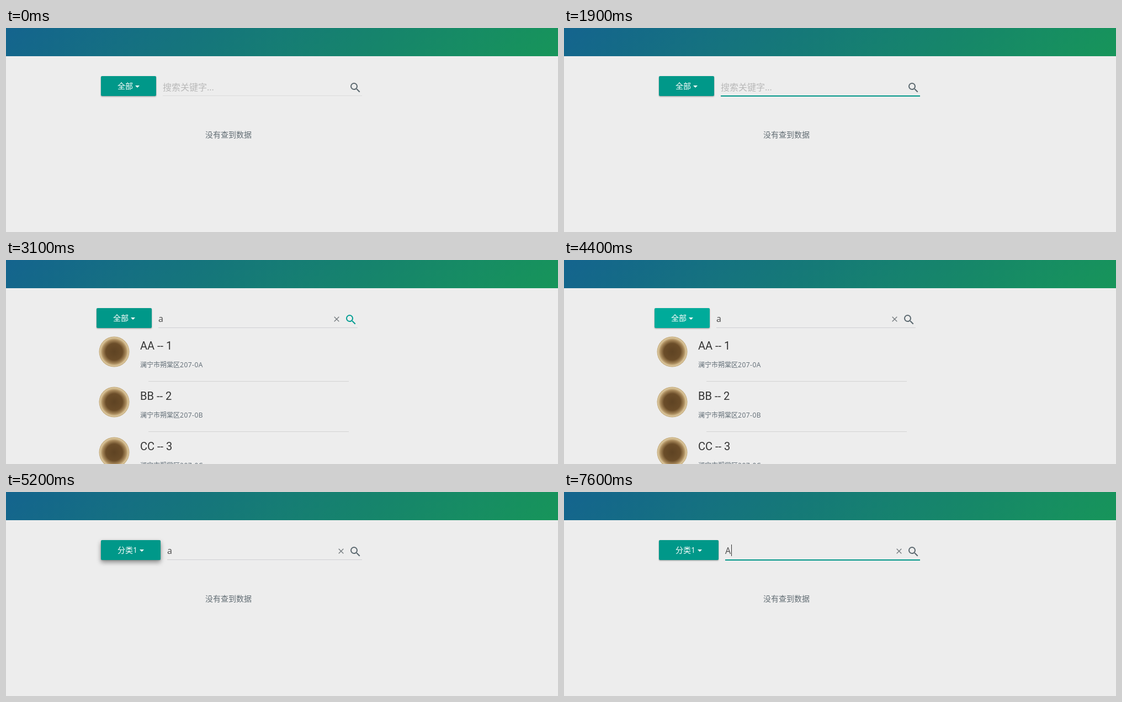
An HTML page that plays this animation: 1000x369 px, repeating every 8 s.

```html
<!DOCTYPE html>
<html lang="zh-CN">
<head>
<meta charset="utf-8">
<title>搜索</title>
<style>
  html, body { margin: 0; width: 100%; height: 100%; overflow: hidden; background: #ededed; }
  svg {
    display: block; width: 1000px; height: 369px;
    background: linear-gradient(135deg, #14648e, #17955a) 0 0 / 1000px 51px no-repeat #ededed;
    font: 14px "Open Sans", "Noto Sans CJK SC", "Noto Sans CJK JP", sans-serif;
  }
  .raised { filter: drop-shadow(0 1px 1px rgba(0,0,0,.26)) drop-shadow(0 1px 1px rgba(0,0,0,.12)); }
  .lifted { filter: drop-shadow(0 4px 4px rgba(0,0,0,.36)) drop-shadow(0 1px 1px rgba(0,0,0,.2)); }
  .label { fill: #fff; font-weight: 500; }
  .field { font-size: 16px; }
  .title { font: 20px Roboto, sans-serif; fill: #333; }
  .address { font-size: 12px; fill: #5f6b74; }
  .address tspan { letter-spacing: .5px; }
</style>
</head>
<body>
<svg viewBox="0 0 1000 369">
  <defs>
    <radialGradient id="sepia">
      <stop offset="0" stop-color="#5e4323"/>
      <stop offset=".55" stop-color="#6b4d29"/>
      <stop offset=".78" stop-color="#a98a5c"/>
      <stop offset=".92" stop-color="#dcc79c"/>
      <stop offset="1" stop-color="#bfa678"/>
    </radialGradient>
    <clipPath id="reveal"><rect id="revealBox" x="150" y="123" width="130"/></clipPath>
  </defs>

  <text id="empty" x="361" y="197.5" fill="#626d74">没有查到数据</text>
  <g id="list"></g>

  <g id="bar">
    <rect id="button" x="172" y="87" height="36" rx="2"/>
    <text id="label" class="label" x="202" y="110"></text>
    <path id="arrow" d="M0 104h8l-4 4z" fill="#fff"/>

    <rect id="line" y="122" height="1"/>
    <rect id="focus" y="122" height="2" fill="#009688"/>
    <rect id="mark" y="95" width="9" height="21" fill="#3390ff"/>
    <text id="hint" class="field" x="284" y="112.5" fill="#b9b9b9">搜索关键字...</text>
    <text id="value" class="field" y="112"></text>
    <rect id="caret" y="95" width="1" height="21" fill="#333"/>
    <path id="clear" d="M602.7 102.7l8.6 8.6m0-8.6l-8.6 8.6" stroke="#71777b" stroke-width="1.3"/>
    <path id="lens" transform="translate(621 96)" d="M15.5 14h-.79l-.28-.27A6.47 6.47 0 0 0 16 9.5 6.5 6.5 0 1 0 9.5 16c1.61 0 3.09-.59 4.23-1.57l.27.28v.79l5 4.99L20.49 19l-4.99-5zm-6 0C7.01 14 5 11.99 5 9.5S7.01 5 9.5 5 14 7.01 14 9.5 11.99 14 9.5 14z"/>
  </g>

  <g id="menu" clip-path="url(#reveal)">
    <rect class="lifted" x="164" y="125" width="100" height="114" rx="2" fill="#fff"/>
    <rect id="hover" x="164" y="156" width="100" height="26" fill="#eee"/>
  </g>
</svg>

<script>
const LOOP = 8000, STEP = 100;
const TEAL = '#009889', LIGHT_TEAL = '#00ab9a', GREY = '#5b686f';
const ui = {};
document.querySelectorAll('[id]').forEach(el => ui[el.id] = el);

const set = (el, attrs) => {
  for (const name in attrs) el.setAttribute(name, attrs[name]);
};
const show = (el, on) => el.style.display = on ? '' : 'none';

ui.list.innerHTML = ['A', 'B', 'C'].map((letter, i) => `
  <g transform="translate(0 ${i * 91})">
    <circle cx="196" cy="166" r="27.5" fill="url(#sepia)"/>
    <text class="title" x="243" y="162">${letter + letter} -- ${i + 1}</text>
    <text class="address" x="243" y="194">澜宁市朔棠区<tspan>207-0${letter}</tspan></text>
    <rect x="258" y="219" width="363" height="1" fill="#d3d3d3"/>
  </g>`).join('');

ui.menu.insertAdjacentHTML('beforeend', ['全部', '分类1', '分类2', '分类3'].map((name, i) =>
  `<text x="184" y="${148 + i * 26}" fill="#333">${name}</text>`).join(''));

const during = (t, from, to) => t >= from && t < to;
const ease = (t, from, length) => {
  const p = Math.min(1, Math.max(0, (t - from) / length));
  return 1 - (1 - p) ** 2;
};

function draw(t) {
  const listed = during(t, 3100, 5200);
  const picked = t >= 5200;
  const typed = t >= 2200;
  const left = picked ? 292 : 284;

  show(ui.list, listed);
  show(ui.empty, !listed);
  set(ui.bar, { transform: `translate(${listed ? -8 : 0} 0)` });

  // category button
  const lit = during(t, 4400, 4900) || during(t, 6000, 6300);
  set(ui.button, {
    width: left - 184,
    fill: lit ? LIGHT_TEAL : TEAL,
    class: during(t, 4500, 5300) ? 'lifted' : 'raised'
  });
  ui.label.textContent = picked ? '分类1' : '全部';
  set(ui.arrow, { transform: `translate(${picked ? 242 : 234} 0)` });

  // drop-down
  const open = ease(t, 4400, 300);
  show(ui.menu, during(t, 4500, 5200));
  show(ui.hover, t >= 4900);
  set(ui.menu, { opacity: open });
  set(ui.revealBox, { height: 132 * open });

  // underline grows from the middle
  const focused = during(t, 1400, 2900) || t >= 6400;
  const grown = focused ? ease(t, t < 2900 ? 1350 : 6350, 300) : 0;
  const full = 645 - left;
  set(ui.line, { x: left, width: full, fill: typed ? '#d0d0d3' : '#dcdcdc' });
  set(ui.focus, { x: left + full * (1 - grown) / 2, width: full * grown });

  // typed text, selection and caret
  const selected = during(t, 7100, 7600);
  show(ui.hint, !typed);
  show(ui.clear, typed);
  show(ui.mark, selected);
  set(ui.mark, { x: left });
  ui.value.textContent = !typed ? '' : t < 7600 ? 'a' : 'A';
  set(ui.value, { x: left, fill: selected ? '#fff' : '#4a4a4a' });
  show(ui.caret, during(t, 1400, 1900) || during(t, 2200, 2900) || during(t, 6400, 6900) || t >= 7600);
  set(ui.caret, { x: left + (!typed ? 0 : t < 7600 ? 9 : 11) });

  set(ui.lens, { fill: during(t, 2500, 3600) ? '#009d92' : during(t, 2400, 2500) ? '#2f8380' : GREY });
}

function tick() {
  const t = performance.now() % LOOP;
  draw(Math.floor(t / STEP) * STEP);
  requestAnimationFrame(tick);
}
tick();
</script>
</body>
</html>
```
